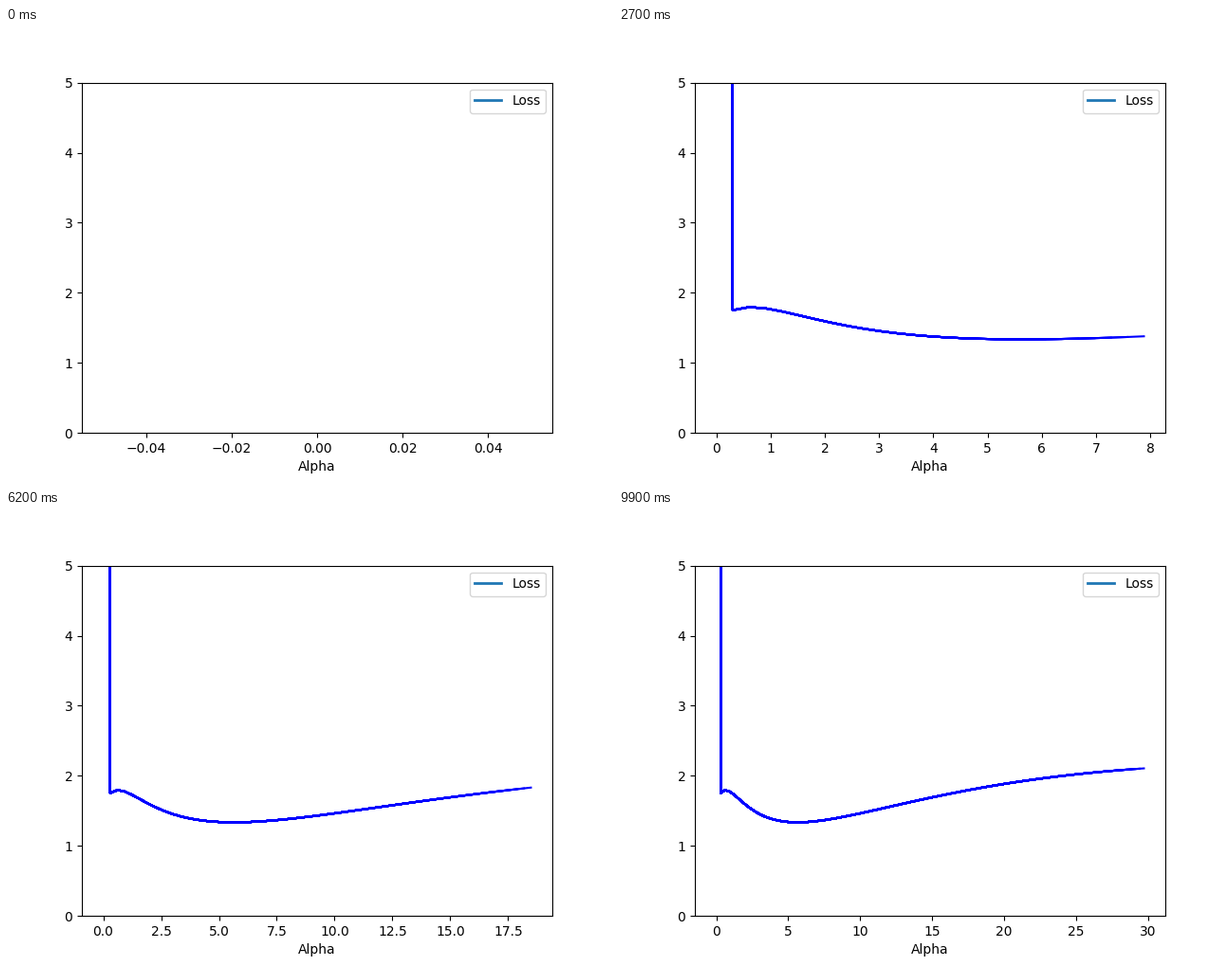
Recreate the animation shown at these times as a matplotlib script. Size 640x480 px, loop 10 s.

```python
import matplotlib.pyplot as plt
import numpy as np
from matplotlib.animation import FuncAnimation

FRAMES = 100
INTERVAL = 100
START_LOSS = 1500

alpha = np.linspace(0, 30, FRAMES)

# Loss at steps 1, 2, 4 ... 64 and 98; a polynomial in log2(step) joins them.
key_steps = np.append(2 ** np.arange(7), 98)
key_loss = [1.752, 1.796, 1.734, 1.527, 1.344, 1.451, 1.864, 2.106]
curve = np.polyfit(np.log2(key_steps), key_loss, len(key_loss) - 1)

steps = np.arange(1, FRAMES)
loss = np.append(START_LOSS, np.polyval(curve, np.log2(steps)))

fig, ax = plt.subplots(figsize=(6.4, 4.8), dpi=100)
ax.plot([], [], lw=2, label="Loss")
ax.set_xlabel("Alpha")
ax.legend(loc="upper right")

# Each step lays a longer line over the earlier ones.
lines = [ax.plot(alpha[:n], loss[:n], color="b", lw=1.5)[0] for n in steps]
ax.set_ylim(0, 5)


def update(frame):
    for n, line in zip(steps, lines):
        line.set_visible(n <= frame)
    if frame < 2:
        ax.set_xlim(-0.055, 0.055)
    else:
        end = alpha[frame - 1]
        ax.set_xlim(-0.05 * end, 1.05 * end)
    return lines


anim = FuncAnimation(fig, update, frames=FRAMES, interval=INTERVAL,
                     repeat=True, repeat_delay=0, blit=False)
plt.show()
```
